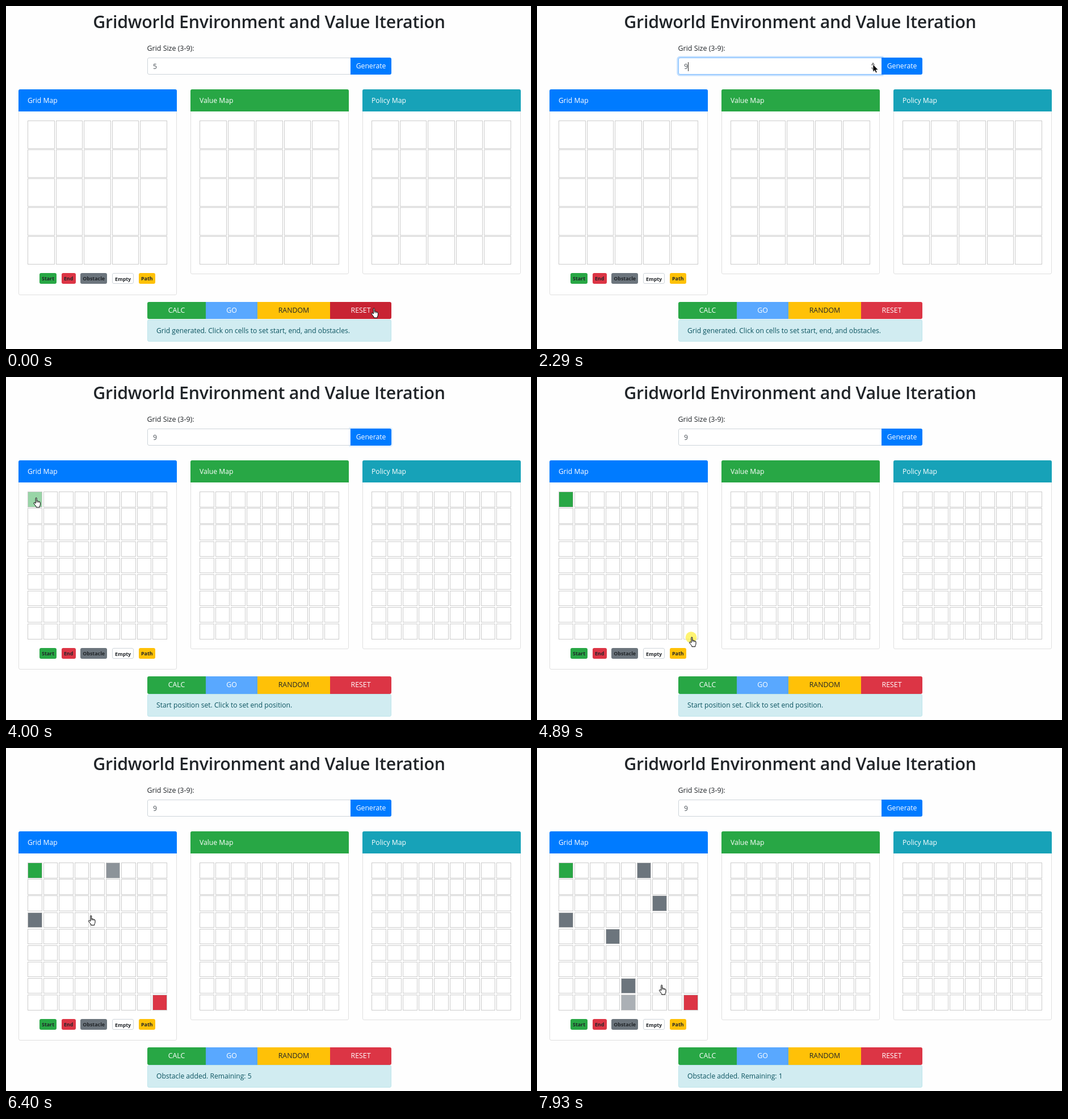
Recreate the animation shown at these times as an HTML page. Size 925 px wide and 605 px high, loop 8 s.

```html
<!DOCTYPE html>
<html lang="en">
<head>
<meta charset="utf-8">
<title>Gridworld</title>
<style>
html, body { margin: 0; width: 100%; height: 100%; overflow: hidden; background: #fefefe; }
body { --d: 0px; position: relative; font: 12.15px "Open Sans", "Noto Sans", sans-serif; color: #212529; }
body.nine { --d: 6.5px; }
body * { box-sizing: border-box; }
h1, .label, .input, #gen, .card, .grid, .row, .alert, #cursor { position: absolute; margin: 0; white-space: nowrap; }
h1 { left: 0; width: 927px; top: 8px; font-size: 30.3px; line-height: 40px; font-weight: 600; letter-spacing: -.22px; text-align: center; }
.label { left: 248.5px; top: 65.4px; line-height: 20px; font-size: 12.45px; }
.input { left: 249px; top: 91px; width: 359px; height: 30px; padding-left: 9px; line-height: 29px;
  border: 1px solid #ced4da; border-radius: 3px 0 0 3px; color: #495057; background: #fff; }
#caret { position: absolute; left: 16px; top: 7px; width: 1px; height: 16px; background: #333; }
#spin { position: absolute; left: 338px; top: 6px; }
.btn { height: 30.4px; line-height: 30px; text-align: center; color: #fff; }
#gen { left: 607px; top: 91px; width: 72px; height: 30px; border-radius: 0 3px 3px 0; background: #007bff; }
.row { display: flex; }
#acts { left: 249px; top: calc(521.9px + var(--d)); border-radius: 3px; overflow: hidden; font-size: 12.35px; }
.card { top: 147px; width: 279px; height: calc(326px + var(--d)); border: 1px solid #dfdfdf; border-radius: 3px; background: #fff; }
.card:first-child { height: calc(362.5px + var(--d)); }
.head { height: 39px; margin: -1px -1px 0; line-height: 40px; padding-left: 16px; color: #fff; border-radius: 3px 3px 0 0; }
.grid { left: 15px; top: 54.2px; width: 246px; display: grid; gap: 1.6px; }
.g5 { height: 253.6px; grid-template: repeat(5, 1fr) / repeat(5, 1fr); }
.g9 { height: 260.4px; grid-template: repeat(9, 1fr) / repeat(9, 1fr); display: none; }
.nine .g5 { display: none; }
.nine .g9 { display: grid; }
.grid i { border: 1px solid #ccc; }
#tags { left: 59px; top: calc(471px + var(--d)); gap: 8.6px; }
.tag { height: 19px; line-height: 19px; border-radius: 3px; font-size: 8.9px; font-weight: 700; text-align: center; }
.empty { border: 1px solid #ced4da; }
.alert { left: 249px; top: calc(552.5px + var(--d)); width: 430px; height: 39.5px; line-height: 38px; padding-left: 15px;
  font-size: 12.1px; color: #0c5460; background: #d1ecf1; border: 1px solid #bee5eb; border-radius: 3px; }
#cursor { left: 0; top: 0; }
</style>
</head>
<body>
<h1>Gridworld Environment and Value Iteration</h1>
<div class="label">Grid Size (3-9):</div>
<div class="input" id="input"><span id="value">5</span><b id="caret"></b>
  <svg id="spin" width="8" height="18"><path d="M.5 6.5L4 1.2 7.5 6.5ZM.5 10.5H7.5L4 15.5Z" fill="#858585"/></svg>
</div>
<div class="btn" id="gen">Generate</div>
<div id="cards"></div>
<div class="row" id="tags"></div>
<div class="row" id="acts"></div>
<div class="alert" id="msg"></div>
<svg id="cursor" width="925" height="605">
  <circle id="ring" r="10" fill="#fff03c" fill-opacity=".72"/>
  <g id="arrow"><path d="M0 0V13.2L3 10.5 5.1 15 7.2 14.1 5.2 9.7H9.2Z" fill="#000" stroke="#fff" stroke-width=".7"/></g>
  <g id="hand"><g transform="translate(-4.8 -.6)" stroke="#000" stroke-linejoin="round">
    <path d="M4 10.6V1.9Q4 .6 5 .6T6 1.9V6.2Q7.6 5.5 8 6.8 9.5 6.3 9.9 7.5 11.8 7.2 12.2 9V12.5Q12 14.6 11 15.8V17.5H5V16Q3 13.8 1 10.8 .3 9.4 1.4 9.1T4 10.6Z" fill="#fff"/>
    <path d="M6 6V9M8 6.8V9.2M10 7.6V9.4" fill="none" stroke-width=".8"/>
  </g></g>
  <g id="beam"><path d="M-2.5 -7H2.5M0 -7V7M-2.5 7H2.5" fill="none" stroke="#222"/></g>
</svg>
<script>
const LOOP = 8000, PRESS = 130;
const GREEN = [40, 167, 69], RED = [220, 53, 69], GRAY = [108, 117, 125], WHITE = [255, 255, 255];
const BLUE = [0, 123, 255], YELLOW = [255, 193, 7];
const $ = id => document.getElementById(id);
const rgb = color => `rgb(${color})`;

function add(parent, cls, text, style = '') {
  const el = document.createElement('div');
  el.className = cls;
  el.textContent = text;
  el.style.cssText = style;
  parent.append(el);
  return el;
}

[['Grid Map', BLUE], ['Value Map', GREEN], ['Policy Map', [23, 162, 184]]].forEach(([name, color], k) => {
  const card = add($('cards'), 'card', '', `left:${22 + 303 * k}px`);
  add(card, 'head', name, `background:${rgb(color)}`);
  for (const n of [5, 9]) add(card, 'grid g' + n, '').innerHTML = '<i></i>'.repeat(n * n);
});
for (const [name, width, color] of [['Start', 30, GREEN], ['End', 25, RED], ['Obstacle', 47, GRAY], ['Empty', 38.6, WHITE], ['Path', 28.6, YELLOW]])
  add($('tags'), 'tag ' + name.toLowerCase(), name, `width:${width}px;background:${rgb(color)}`);
for (const [name, width, color] of [['CALC', 103, GREEN], ['GO', 91, [89, 168, 255]], ['RANDOM', 128, YELLOW], ['RESET', 108, RED]])
  add($('acts'), 'btn', name, `width:${width}px;background:${rgb(color)}`);
const [, , random, reset] = $('acts').children;
random.style.color = '#212529';
const cells = document.querySelector('.g9').children;

// The pointer rests at each stop until its time; a click is released at that moment.
const stops = [];
const stop = (at, x, y, click) => stops.push({ at, x, y, click });
const fills = [];
function fillCell(at, row, col, dx = 0, dy = 0) {
  const color = [GREEN, RED][fills.length] || GRAY;
  fills.push({ at, color, el: cells[row * 9 + col] });
  stop(at, 51 + 27.45 * col + dx, 216 + 29.1 * row + dy, true);
}

const FIRST_STEP = 1300, STEP = 328, GENERATE = 2930;
stop(20, 648, 533);
stop(740, 588, 91);
for (let i = 0; i < 4; i++) stop(FIRST_STEP + STEP * i, 592, 103, true);
stop(GENERATE, 640, 105, true);
fillCell(3925, 0, 0, 2, -3);
fillCell(4955, 8, 8, 2, 10);
fillCell(5615, 3, 0, -5);
fillCell(6250, 0, 5, 0, -8);
fillCell(6616, 4, 3);
fillCell(7070, 2, 6);
fillCell(7470, 7, 4);
fillCell(7835, 8, 4, -10);
stop(LOOP + 60, 219.5, 418);

const clamp = x => Math.min(1, Math.max(0, x));
const fade = (t, from, ms = 150) => 1 - Math.pow(1 - clamp((t - from) / ms), 2.2);
const pulse = (t, from, to) => fade(t, from) - fade(t, to);
const mix = (a, b, k) => rgb(a.map((v, i) => Math.round(v + (b[i] - v) * k)));
const show = (el, on) => { el.style.display = on ? '' : 'none'; };

// Each trip ends when the next press begins; longer ways take more time.
function pointer(t) {
  const i = stops.findIndex(s => s.at > t);
  const to = stops[i], from = stops[i - 1] || to;
  const dx = to.x - from.x, dy = to.y - from.y, arrive = to.at - PRESS;
  const leave = Math.max(from.at, arrive - 350 - Math.hypot(dx, dy));
  const p = clamp((t - leave) / (arrive - leave)), k = p * p * (3 - 2 * p);
  return { x: from.x + dx * k, y: from.y + dy * k, pressed: to.click && t >= arrive };
}

function shape(x, y, nine) {
  const inBar = (top, left) => y >= top && y <= top + 30 && x >= left && x <= 679;
  const onGrid = x >= 38 && (x - 38) % 303 < 246 && y >= 202 && y <= (nine ? 463 : 456);
  if (inBar(91, 607) || inBar(nine ? 528 : 522, 249) || onGrid) return 'hand';
  return inBar(91, 249) && x < 584 ? 'beam' : 'arrow';
}

function message(t) {
  const placed = fills.filter(f => f.at <= t).length;
  return [
    'Grid generated. Click on cells to set start, end, and obstacles.',
    'Start position set. Click to set end position.',
    'End position set. Click cells to add obstacles.'
  ][placed] || `Obstacle added. Remaining: ${9 - placed}`;
}

function draw(t) {
  const nine = t >= GENERATE;
  document.body.classList.toggle('nine', nine);
  const { x, y, pressed } = pointer(t), kind = shape(x, y, nine);
  for (const id of ['arrow', 'hand', 'beam']) {
    show($(id), id === kind);
    $(id).setAttribute('transform', `translate(${x} ${y})`);
  }
  $('ring').setAttribute('cx', x - 1);
  $('ring').setAttribute('cy', y + .5);
  show($('ring'), pressed);

  const blur = GENERATE - PRESS, focused = t >= FIRST_STEP && t < blur;
  const count = Math.min(4, Math.max(0, Math.floor((t - FIRST_STEP) / STEP) + 1));
  const sinceStep = t - FIRST_STEP - STEP * (count - 1);
  const hovered = x >= 249 && x < 607 && y >= 91 && y <= 121;
  $('value').textContent = 5 + count;
  show($('caret'), focused && sinceStep % 1060 < 530);
  show($('spin'), hovered || focused);
  const focus = pulse(t, FIRST_STEP, blur);
  $('input').style.borderColor = mix([206, 212, 218], [128, 189, 255], focus);
  $('input').style.boxShadow = `0 0 0 2.6px rgba(0,123,255,${.25 * focus})`;

  $('gen').style.background = mix(BLUE, [0, 105, 217], pulse(t, 2550, 3050));
  $('gen').style.boxShadow = `0 0 0 2.6px rgba(0,123,255,${.5 * pulse(t, blur, fills[0].at)})`;
  reset.style.background = mix([200, 35, 51], RED, fade(t, 95));

  for (const { at, color, el } of fills) el.style.background = mix(WHITE, color, fade(t, at, 300));
  const text = message(t);
  if ($('msg').textContent !== text) $('msg').textContent = text;
}

const origin = performance.now();
function tick() {
  draw((performance.now() - origin) % LOOP);
  requestAnimationFrame(tick);
}
draw(0);
requestAnimationFrame(tick);
</script>
</body>
</html>
```
